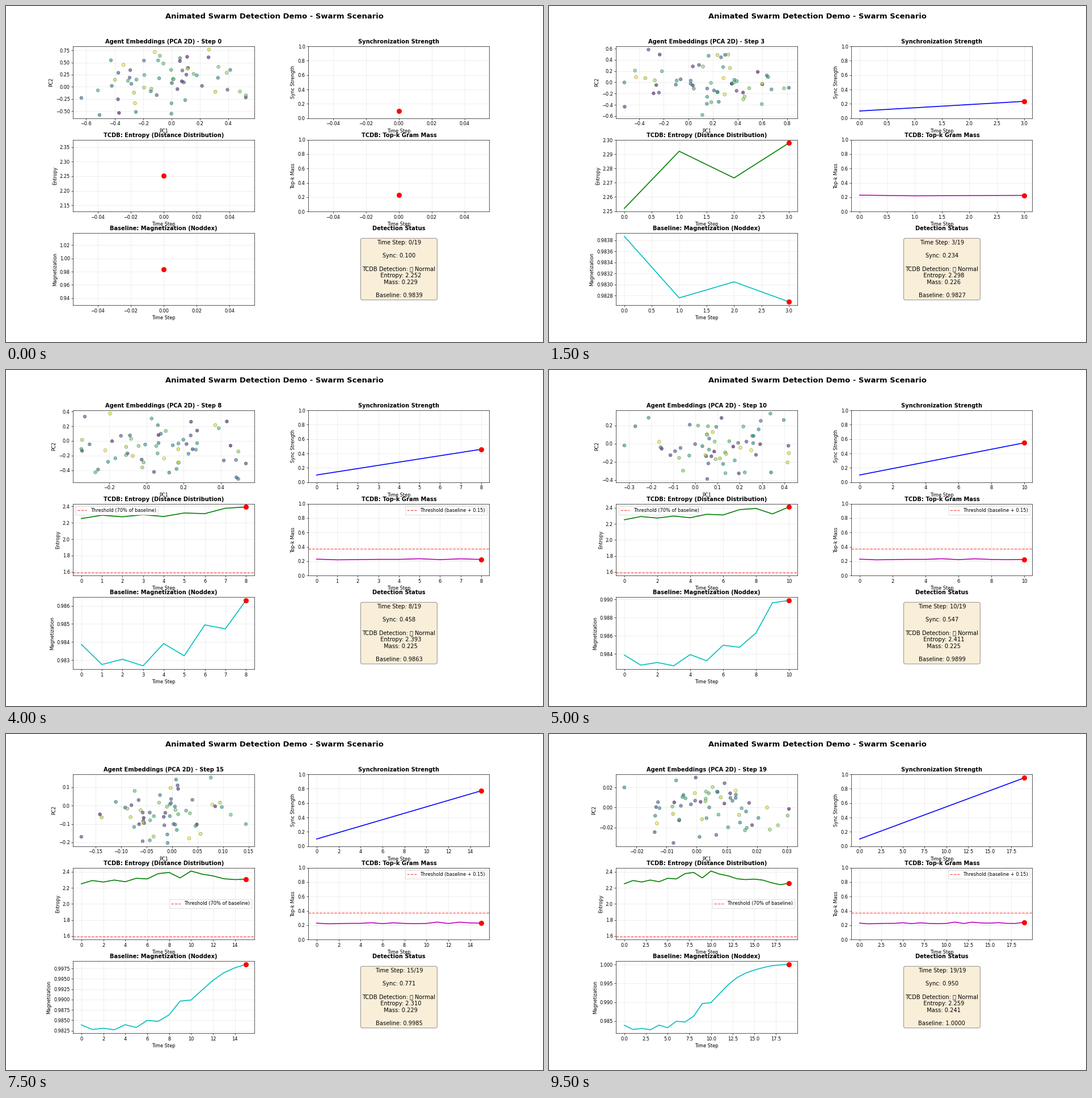
Write a matplotlib script that moves like this. It is 947 px wide and 592 px high and loops after 10000 ms.

```python
import matplotlib.pyplot as plt
import numpy as np
from matplotlib.animation import FuncAnimation

plt.rcParams["font.family"] = "DejaVu Sans"

STEPS = 20
AGENTS = 60
WARMUP = 5
NO_GLYPH = "\U0001F7E2"  # not in the font, shows as an empty box

steps = np.arange(STEPS)
sync = np.linspace(0.1, 0.95, STEPS)
entropy = np.array([2.252, 2.2922, 2.2734, 2.298, 2.277, 2.320, 2.312, 2.378,
                    2.393, 2.325, 2.411, 2.372, 2.350, 2.314, 2.304, 2.310,
                    2.297, 2.264, 2.240, 2.259])
mass = np.array([0.229, 0.220, 0.223, 0.226, 0.226, 0.235, 0.222, 0.234,
                 0.225, 0.222, 0.225, 0.244, 0.224, 0.243, 0.232, 0.229,
                 0.236, 0.226, 0.225, 0.241])
magnetization = np.array([0.98387, 0.98276, 0.98305, 0.98269, 0.98392, 0.98324,
                          0.98495, 0.98473, 0.98630, 0.98962, 0.98988, 0.99230,
                          0.99465, 0.99650, 0.99770, 0.99850, 0.99915, 0.99965,
                          0.99988, 1.0])
entropy_limit = 0.7 * entropy[:WARMUP].mean()
mass_limit = mass[:WARMUP].mean() + 0.15

# Extent of the agent cloud at a few steps, shrinking as the swarm aligns.
KEY_STEPS = [0, 3, 5, 8, 13, 15, 19]
EXTENT = {
    "x_min": [-0.634, -0.520, -0.565, -0.350, -0.274, -0.178, -0.0240],
    "x_max": [0.522, 0.815, 0.613, 0.535, 0.251, 0.145, 0.0306],
    "y_min": [-0.580, -0.579, -0.486, -0.515, -0.200, -0.203, -0.0352],
    "y_max": [0.766, 0.582, 0.631, 0.371, 0.268, 0.153, 0.0297],
}

fig = plt.figure(figsize=(16, 10), dpi=59.2)
fig.suptitle("Animated Swarm Detection Demo - Swarm Scenario",
             fontsize=16, fontweight="bold")
grid = fig.add_gridspec(3, 2, hspace=0.3, wspace=0.3)
ax_pca, ax_sync, ax_entropy, ax_mass, ax_base, ax_status = (
    fig.add_subplot(grid[row, col]) for row in range(3) for col in range(2))


def spread(values, low, high):
    unit = (values - values.min()) / np.ptp(values)
    return low + unit * (high - low)


def agent_cloud(step):
    rng = np.random.default_rng(100 + step)
    raw = np.clip(rng.normal(size=(2, AGENTS)), -2.1, 2.1)
    raw += rng.uniform(-0.3, 0.3, raw.shape)
    at = {key: np.interp(step, KEY_STEPS, vals) for key, vals in EXTENT.items()}
    return (spread(raw[0], at["x_min"], at["x_max"]),
            spread(raw[1], at["y_min"], at["y_max"]))


def decorate(ax, title, xlabel, ylabel):
    ax.set_title(title, fontsize=12, fontweight="bold")
    ax.set_xlabel(xlabel)
    ax.set_ylabel(ylabel)
    ax.grid(True, alpha=0.3)


def draw_series(ax, step, values, color, title, ylabel, ylim=None):
    ax.clear()
    ax.plot(steps[:step + 1], values[:step + 1], color + "-", linewidth=2)
    ax.plot(step, values[step], "ro", markersize=10)
    decorate(ax, title, "Time Step", ylabel)
    if ylim:
        ax.set_ylim(*ylim)


def draw_threshold(ax, level, label, loc):
    ax.axhline(level, color="r", linestyle="--", alpha=0.7, label=label)
    ax.legend(loc=loc)


def draw_agents(step):
    ax_pca.clear()
    x, y = agent_cloud(step)
    ax_pca.scatter(x, y, c=np.arange(AGENTS), cmap="viridis", s=50, alpha=0.6,
                   edgecolors="black", linewidths=0.5)
    decorate(ax_pca, f"Agent Embeddings (PCA 2D) - Step {step}", "PC1", "PC2")


def draw_status(step):
    ax_status.clear()
    ax_status.axis("off")
    ax_status.set_title("Detection Status", fontsize=12, fontweight="bold")
    text = (f"Time Step: {step}/{STEPS - 1}\n\n"
            f"Sync: {sync[step]:.3f}\n\n"
            f"TCDB Detection: {NO_GLYPH} Normal\n"
            f"  Entropy: {entropy[step]:.3f}\n"
            f"  Mass: {mass[step]:.3f}\n\n"
            f"Baseline: {magnetization[step]:.4f}")
    ax_status.text(0.5, 0.5, text, fontsize=12, ha="center", va="center",
                   transform=ax_status.transAxes,
                   bbox=dict(boxstyle="round", facecolor="wheat", alpha=0.5))


def update(step):
    draw_agents(step)
    draw_series(ax_sync, step, sync, "b",
                "Synchronization Strength", "Sync Strength", (0, 1))
    draw_series(ax_entropy, step, entropy, "g",
                "TCDB: Entropy (Distance Distribution)", "Entropy")
    draw_series(ax_mass, step, mass, "m",
                "TCDB: Top-k Gram Mass", "Top-k Mass", (0, 1))
    draw_series(ax_base, step, magnetization, "c",
                "Baseline: Magnetization (Noddex)", "Magnetization")
    if step >= WARMUP - 1:
        # The upper left corner is only free of the curve for a few steps.
        loc = "upper left" if 8 <= step <= 10 else "center right"
        draw_threshold(ax_entropy, entropy_limit,
                       "Threshold (70% of baseline)", loc)
        draw_threshold(ax_mass, mass_limit,
                       "Threshold (baseline + 0.15)", "upper right")
    draw_status(step)


animation = FuncAnimation(fig, update, frames=STEPS, interval=500,
                          repeat=True, repeat_delay=0)
plt.show()
```
